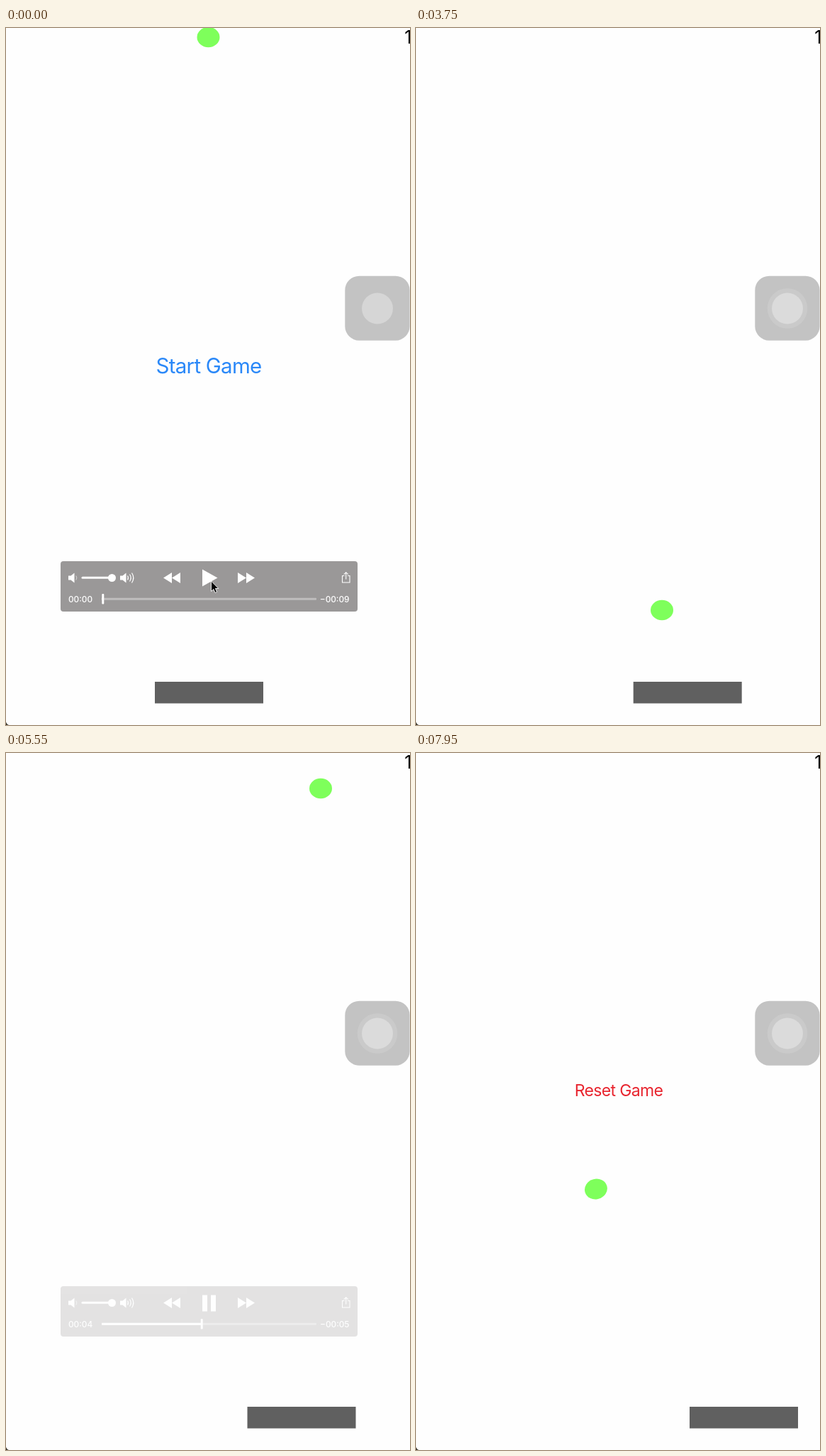
Write an HTML page that moves like this. It is 570 px wide and 983 px high and loops after 8 s.

```html
<!DOCTYPE html>
<html lang="en">
<head>
<meta charset="utf-8">
<title>Paddle game</title>
<style>
  html, body { margin: 0; width: 100%; height: 100%; overflow: hidden; background: #fefefe; }
  svg { display: block; width: 570px; height: 983px; }
  text { font-family: Inter, Roboto, sans-serif; }
  .time { font-size: 11.8px; font-weight: 500; fill: #fff; }
</style>
</head>
<body>
<svg viewBox="0 0 570 983">
  <rect width="570" height="983" fill="#fefefe"/>
  <path d="M0 979Q1 982 4 983H0Z" fill="#333026"/>
  <text x="572.3" y="22.3" font-size="25" text-anchor="end">1</text>
  <text id="start" x="286" y="486.5" font-size="29.5" letter-spacing="-.75" text-anchor="middle" fill="#2a88f8">Start Game</text>
  <text id="reset" x="286" y="484.3" font-size="23" letter-spacing="-.65" text-anchor="middle" fill="#e8252f">Reset Game</text>
  <rect id="paddle" y="922" width="153" height="30.5" fill="#606060"/>
  <ellipse id="ball" rx="16" ry="14.3" fill="#7eff5b"/>

  <g id="assist">
    <rect x="478.3" y="349.7" width="91.3" height="91" rx="20" fill="#6a6a6a" opacity=".4"/>
    <circle id="ring" cx="524" cy="395.5" r="28.3" fill="#fff" opacity=".12"/>
    <circle cx="524" cy="395.5" r="22" fill="#fff" opacity=".31"/>
  </g>

  <g id="panel" fill="#fff">
    <rect x="77" y="752" width="419" height="71" rx="4" fill="#9a9898"/>
    <g id="speaker"><path d="M88 772.5h3.5l5-4v14l-5-4H88Z"/></g>
    <path d="M98.8 772.5q2 3 0 6" fill="none" stroke="#fff" stroke-opacity=".6"/>
    <rect x="106.500" y="773.800" width="44" height="3" rx="1.5"/>
    <circle cx="149.500" cy="775.500" r="5.5"/>
    <path d="M161 772.500h3.500l5-4v14l-5-4H161Z"/>
    <path d="M171.500 772.500q2 3 0 6M174.500 770.500q3.400 5 0 10M177.500 768.500q4.600 7 0 14" fill="none" stroke="#fff" stroke-width="1.2"/>
    <path d="M234 768v15l-12-7.500ZM246 768v15l-12-7.500Z"/>
    <path d="M327 768v15l12-7.500ZM339 768v15l12-7.500Z"/>
    <path id="play" d="M277 763.500v24l21.500-12Z"/>
    <path id="pause" d="M277 764.500h7v23h-7ZM289 764.500h7v23h-7Z"/>
    <path d="M477.500 772.500h-3v9.500h10.500v-9.500h-3M479.700 777.500v-9.500M476.700 770.700l3-3 3 3" fill="none" stroke="#fff" stroke-width="1.1"/>
    <rect x="136" y="803.800" width="302" height="3" rx="1" opacity=".36"/>
    <rect id="bar" x="135" y="803.800" height="3"/>
    <rect id="knob" y="798" width="3" height="14.500" rx="1"/>
    <text id="gone" class="time" x="88" y="809.500"></text>
    <text id="left" class="time" x="484.500" y="809.500" text-anchor="end"></text>
  </g>
  <path id="cursor" d="M289.500 780v14.500l3.300-3 2.300 5 2.500-1.100-2.200-4.900h4.400Z" fill="#000" stroke="#fff" stroke-width=".9"/>
</svg>
<script>
const LOOP = 8000, STEP = 150, PLAY_AT = 980, LENGTH = 9.9;
const el = id => document.getElementById(id);
const set = (id, attrs) => { for (const k in attrs) el(id).setAttribute(k, attrs[k]); };
const show = (id, on) => set(id, { opacity: +on });
const clamp = v => Math.min(1, Math.max(0, v));
const ramp = (t, a, b) => clamp((t - a) / (b - a));
const ease = u => u * u * (3 - 2 * u);

// time, x, y: straight flights between bounces
const flight = [
  [0, 285.5, 13], [2451, 285.5, 13], [3033, 20, 375], [3750, 347, 821],
  [3890, 411, 908], [4200, 550, 723], [4650, 515, 456], [5481, 449.5, 13],
  [5550, 444, 50], [6900, 337, 736], [7350, 301, 957], [8000, 250, 586.5]
];
const spin = [[0, 0], [3890, 0], [4200, 10], [4650, -48], [5550, -180], [6900, -310], [7350, -350], [7950, -375], [8000, -377]];

function along(keys, t) {
  let i = 1;
  while (i < keys.length - 1 && keys[i][0] < t) i++;
  const a = keys[i - 1], b = keys[i], u = ramp(t, a[0], b[0]);
  return a.slice(1).map((v, k) => v + (b[k + 1] - v) * u);
}

const clock = s => '00:' + String(Math.floor(s)).padStart(2, '0');

function draw(t) {
  const [x, y] = along(flight, t), [angle] = along(spin, t);
  set('ball', { transform: `translate(${x} ${y}) rotate(${angle})` });
  set('paddle', { x: 210 + 130.5 * ease(ramp(t, 3350, 3950)) + 45.5 * ease(ramp(t, 5650, 6350)) });

  set('start', { opacity: t < 2400 ? 1 : t < 2550 ? .2 : 0 });
  show('reset', t >= 7370);
  set('ring', { opacity: t < 1050 ? 0 : .12 });

  const first = 1 - ramp(t, 900, 1650);
  const second = ramp(t, 4700, 4850) * (1 - ramp(t, 5000, 5752));
  set('panel', { opacity: Math.max(first, second) });
  show('play', t < 450);
  show('pause', t >= 450);
  show('cursor', t < 750);

  const s = Math.max(0, (t - PLAY_AT) / 1000), pos = 302 * s / LENGTH;
  set('bar', { width: pos + 1 });
  set('knob', { x: 135.3 + pos });
  el('gone').textContent = clock(s);
  el('left').textContent = '\u2212' + clock(LENGTH - s);
}

const begin = performance.now();
function tick(now) {
  const t = Math.max(0, now - begin) % LOOP;
  draw(Math.floor(t / STEP) * STEP);
  requestAnimationFrame(tick);
}
draw(0);
requestAnimationFrame(tick);
</script>
</body>
</html>
```
